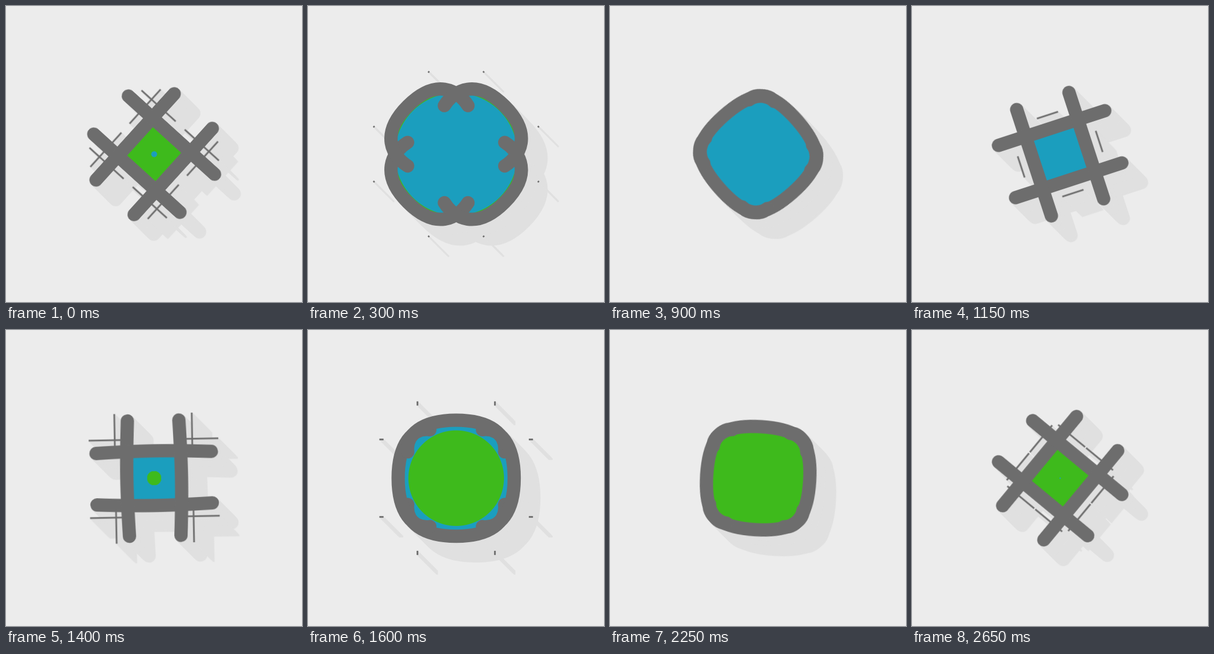
Write an HTML page without scripts that moves like this. It is 512 by 512 pixels and loops after 2700 ms.

```html
<!DOCTYPE html>
<html lang="en">
<head>
<meta charset="utf-8">
<title>Clover and lattice</title>
<style>
  html, body { margin: 0; width: 100%; height: 100%; overflow: hidden; background: #ececec; }
  svg { display: block; width: 100vw; height: 100vh; }
  .shadowed {
    --shade: #e0e0e0;
    filter:
      drop-shadow(1px 1px 0 var(--shade)) drop-shadow(2px 2px 0 var(--shade))
      drop-shadow(4px 4px 0 var(--shade)) drop-shadow(8px 8px 0 var(--shade))
      drop-shadow(16px 16px 0 var(--shade)) drop-shadow(3.5px 3.5px 0 var(--shade));
  }
  .body { fill: url(#flood); }
  .outline { fill: none; stroke: #6d6d6d; stroke-width: 23; stroke-linecap: round; stroke-linejoin: round; }
  .streaks { fill: none; stroke: #6d6d6d; stroke-width: 2.9; }
</style>
</head>
<body>
<svg viewBox="0 0 512 512">
  <defs>
    <!-- The next colour spreads from the centre as a disc -->
    <radialGradient id="flood" gradientUnits="userSpaceOnUse" cx="0" cy="0" r="5">
      <stop offset=".988" stop-color="#1b9ebe">
        <animate attributeName="stop-color" values="#1b9ebe;#3eba1c" calcMode="discrete"
          dur="2.7s" begin="-.1s" repeatCount="indefinite"/>
      </stop>
      <stop offset="1" stop-color="#3eba1c">
        <animate attributeName="stop-color" values="#3eba1c;#1b9ebe" calcMode="discrete"
          dur="2.7s" begin="-.1s" repeatCount="indefinite"/>
      </stop>
      <animate attributeName="r" values="0;1;5;82.7;200;200" keyTimes="0;.037;.0741;.2593;.4444;1"
        calcMode="spline" keySplines="0 0 1 1;0 0 1 1;.4 .1 .7 .7;0 0 1 1;0 0 1 1"
        dur="1.35s" begin="-.1s" repeatCount="indefinite"/>
    </radialGradient>

    <!-- One side: straight bar, bulge, petal and back -->
    <path id="side" d="M44.5 100.5C44.5 67 44.5 33.5 44.5 0S44.5 -67 44.5 -100.5">
      <animate attributeName="d" dur="1.35s" repeatCount="indefinite" calcMode="spline"
        keyTimes="0;.1852;.4222;.4593;.6667;.8296;.963;1"
        keySplines=".12 0 .39 0;.61 1 .88 1;0 0 1 1;.12 0 .39 0;.61 1 .88 1;0 0 1 1;0 0 1 1"
        values="M44.5 100.5C44.5 67 44.5 33.5 44.5 0S44.5 -67 44.5 -100.5;
                M45.5 84C75 88 100 59 100 0S75 -88 45.5 -84;
                M43.5 43.5C81 58.5 172.5 99 172.5 0S81 -58.5 43.5 -43.5;
                M43.5 43.5C81 58.5 172.5 99 172.5 0S81 -58.5 43.5 -43.5;
                M50 81C72 82 89.5 56 89.5 0S72 -82 50 -81;
                M47.8 96C47.8 65 47.8 33 47.8 0S47.8 -65 47.8 -96;
                M46.3 100C46.3 67 46.3 33 46.3 0S46.3 -67 46.3 -100;
                M44.5 100.5C44.5 67 44.5 33.5 44.5 0S44.5 -67 44.5 -100.5"/>
    </path>

    <path id="streak" d="M67 10L67 90">
      <animate attributeName="d" dur="1.35s" begin="-.35s" repeatCount="indefinite"
        keyTimes="0;.037;.1111;.2222;.2593;.2963;.3704;.4444;.5037;1"
        values="M73 0L73 0;M72.5 0L72.5 3;M71 0L71 19;M69 1L69 61;M67 10L67 90;
                M67 38L67 112;M67 98L67 126;M67 125.5L67 132.8;M67 137L67 137;M67 137L67 137"/>
    </path>
    <g id="streakPair">
      <use href="#streak"/>
      <use href="#streak" transform="scale(1 -1)"/>
    </g>

    <g id="sides">
      <use href="#side"/>
      <use href="#side" transform="rotate(90)"/>
      <use href="#side" transform="rotate(180)"/>
      <use href="#side" transform="rotate(270)"/>
    </g>
  </defs>

  <g class="shadowed">
    <g transform="translate(256.3 256.3)">
      <g>
        <animateTransform attributeName="transform" type="rotate" values="45;90;90;135;135"
          keyTimes="0;.2593;.5;.7593;1" calcMode="spline"
          keySplines=".4 0 .55 .95;0 0 1 1;.4 0 .55 .95;0 0 1 1"
          dur="2.7s" begin="-1.935s" repeatCount="indefinite"/>
        <g class="body">
          <rect x="-50" y="-50" width="100" height="100"/>
          <use href="#sides"/>
        </g>
        <g class="streaks">
          <use href="#streakPair"/>
          <use href="#streakPair" transform="rotate(90)"/>
          <use href="#streakPair" transform="rotate(180)"/>
          <use href="#streakPair" transform="rotate(270)"/>
        </g>
        <use class="outline" href="#sides"/>
      </g>
    </g>
  </g>
</svg>
</body>
</html>
```
